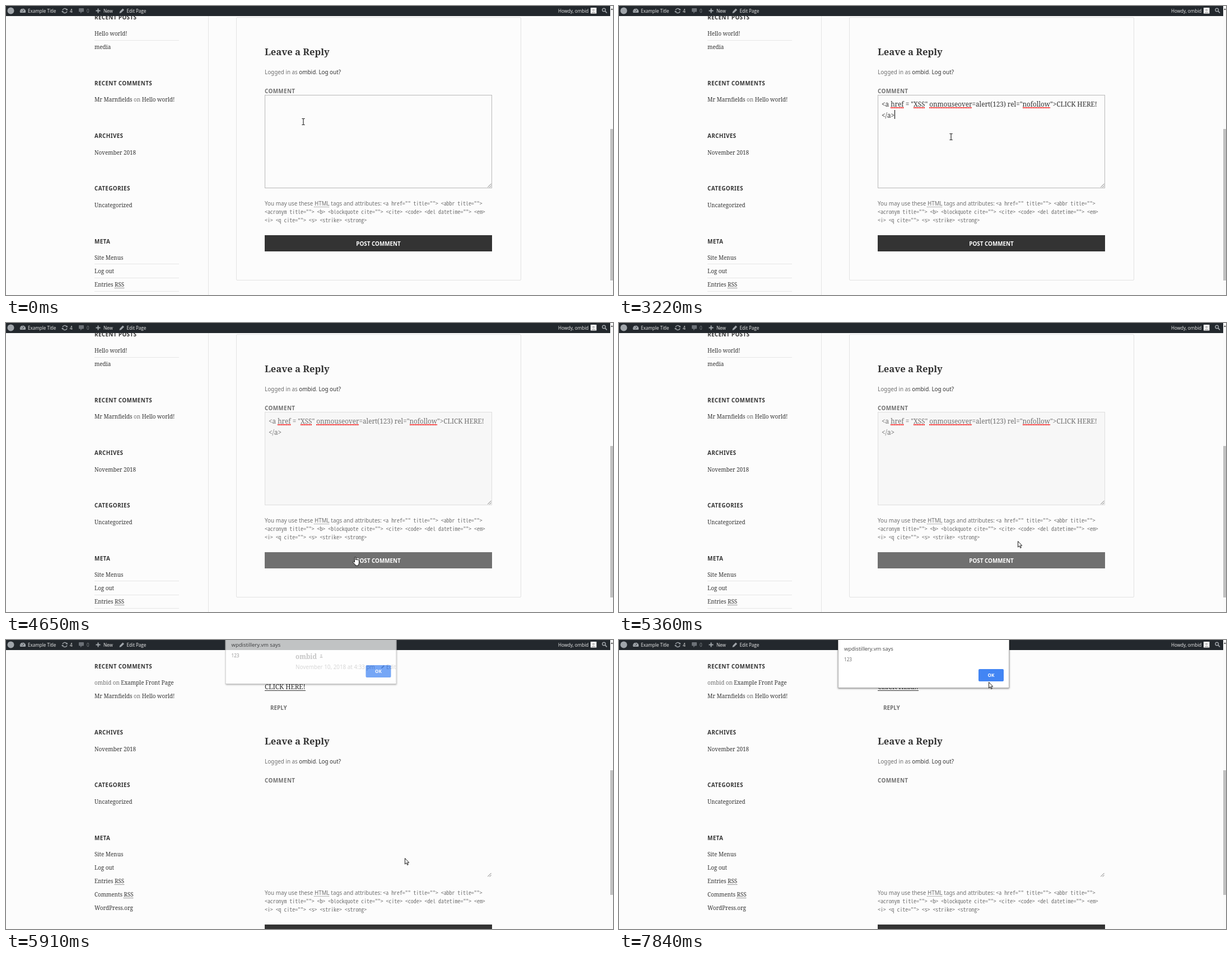
Recreate the animation shown at these times as an HTML page. Size 1084 by 517 pixels, loop 8 s.

```html
<!DOCTYPE html>
<html lang="en">
<head>
<meta charset="utf-8">
<title>Comment form</title>
<style>
html, body { margin: 0; width: 100%; height: 100%; overflow: hidden; background: #fcfcfc; }
#stage { position: relative; width: 1084px; height: 517px; overflow: hidden; background: #fcfcfc; color: #333; }
#stage div, svg { position: absolute; }
.t { white-space: pre; font: 9.85px/0 "Noto Sans", sans-serif; }
.serif { font-family: "Noto Serif", serif; }
.big { font-size: 11.7px; }
.head { font-size: 16.6px; font-weight: bold; }
.cap { font-weight: bold; letter-spacing: .04em; }
.bar { font: 8.1px/0 "Open Sans", sans-serif; color: #eee; }
.bold { font-weight: bold; }
.grey, i { color: #707070; font-style: normal; }
code { font: 9.85px/0 "Noto Sans Mono CJK JP", "Noto Sans Mono", monospace; }
u { text-decoration: underline dotted 1px; text-underline-offset: 2px; }
s { text-decoration: none; background: repeating-linear-gradient(90deg, #e33 0 2px, #f99 2px 3px) 0 100% / 100% 2px no-repeat; }
#area { box-sizing: border-box; left: 462px; top: 159px; width: 406px; height: 167px; border: 1px solid #b8b8b8; }
#area.off { background: #f7f7f7; border-color: #dedede; }
#post { left: 462px; top: 410px; width: 406px; height: 29px; background: #333; }
#caret { width: 1px; height: 16px; background: #000; }
#track { left: 1079px; top: 0; width: 5px; height: 517px; background: #fafafa; }
#thumb { left: 1079px; width: 5px; background: #c1c1c1; }
#top { left: 0; top: 0; width: 1079px; height: 18px; background: #23282d; }
#dialog { box-sizing: border-box; left: 391px; top: -10px; width: 306px; height: 96px; background: #fff; border: 1px solid #b4b4b4; box-shadow: 0 1px 3px #0007; }
#ok { left: 250px; top: 61px; width: 45px; height: 22px; border-radius: 2px; background: #4285f4; }
</style>
</head>
<body>
<div id="stage">
  <div id="before"></div>
  <div id="after"></div>
  <div id="form">
    <div id="area"></div>
    <div id="code"></div>
    <div id="caret"></div>
    <div id="post"></div>
    <svg width="8" height="8" style="left:860px;top:318px" stroke="#777"><path d="M0 6.5 6.5 0M3.5 6.5 6.5 3.5"/></svg>
  </div>
  <div id="track"></div>
  <div id="thumb"></div>
  <div id="top">
    <svg width="1084" height="18" fill="none" stroke="#a0a5aa" stroke-width="1.4">
      <circle cx="8.5" cy="8.5" r="6" fill="#a0a5aa" stroke="none"/>
      <path d="M25.3 12A5.2 5.2 0 1 1 34.7 12Z" fill="#a0a5aa" stroke="none"/>
      <path d="M29.5 10.5 32 6.5M26.5 9h1M29.5 5.2v1" stroke="#23282d" stroke-width="1"/>
      <path d="M101 7.5A4 4 0 0 1 108 6M109 9.5A4 4 0 0 1 102 11"/>
      <path d="M106.5 7.5h4L109 4.5ZM99 9h4l-2 3Z" fill="#a0a5aa" stroke="none"/>
      <path d="M131 4h7q1 0 1 1v4.5q0 1-1 1h-2.5l-2.5 3v-3h-2q-1 0-1-1v-4.5q0-1 1-1Z" fill="#6c7177" stroke="none"/>
      <path d="M160.5 8.5h8M164.5 4.5v8" stroke-width="2"/>
      <path d="M202.5 13 203.2 10 208.5 4.5 211 7 205.5 12.3Z" fill="#a0a5aa" stroke="none"/>
      <path d="M1044 3h10.5v10.5h-10.5Z" fill="#fff" stroke="none"/>
      <path d="M1045 13.5q0-3 4.2-3.3 4.2.3 4.2 3.3Z" fill="#c4c4c4" stroke="none"/>
      <circle cx="1049.2" cy="7.3" r="2.3" fill="#c4c4c4" stroke="none"/>
      <circle cx="1067.8" cy="7" r="2.8"/><path d="M1070 9.2 1073 12.5" stroke-width="1.8"/>
    </svg>
  </div>
  <svg width="4" height="4" style="left:1080px;top:4px"><path d="M0 3 2 0 4 3Z" fill="#555"/></svg>
  <div id="dialog"><div id="ok"></div></div>
  <svg id="cursor" width="20" height="24" style="left:0;top:0;overflow:visible" stroke="#000" stroke-linejoin="round">
    <path id="I" fill="none" d="M-2.5-5.5h2L0-5 .5-5.5h2M0-5V5M-2.5 5.5h2L0 5 .5 5.5h2"/>
    <path id="H" fill="#fff" stroke-width=".9" d="M-2.5 2V-6q0-1.3 1.1-1.3T-.3-6v4q0-1 1-1t1 1q0-.8 1-.8t1 1q0-.6.9-.6t.9 1V3q0 2-1.3 3.5V8h-5.3V6.5L-5 2.5q-.6-1.2.3-1.6t2.2 1.1Z"/>
    <path id="A" fill="#fff" stroke-width=".9" d="M.5.5V11L3 8.7 4.7 12.5 6.3 11.9 4.7 8.2H7.7Z"/>
  </svg>
</div>
<script>
const $ = id => document.getElementById(id);

// Text is placed by its left edge and the middle of its capitals.
function text(box, x, y, cls, html) {
  const el = document.createElement('div');
  el.className = 't ' + cls;
  el.style.cssText = `left:${x}px;top:${y}px`;
  el.innerHTML = html;
  $(box).append(el);
  return el;
}
function rect(box, x, y, w, h, style) {
  const el = document.createElement('div');
  el.style.cssText = `left:${x}px;top:${y}px;width:${w}px;height:${h}px;${style}`;
  $(box).append(el);
}
const title = (box, y, s) => text(box, 158, y, 'cap', s);
const item = (box, y, s) => text(box, 158, y, 'serif', s);

// Page before posting
rect('before', 361, 18, 1, 499, 'background:#e4e4e4');
rect('before', 411, 20, 507, 469, 'border:1px solid #e2e2e2;border-radius:2px');
for (const y of [61, 461, 486, 510]) rect('before', 158, y, 151, 1, 'background:#e6e6e6');
title('before', 20, 'RECENT POSTS');
item('before', 49, 'Hello world!');
item('before', 73, 'media');
title('before', 138, 'RECENT COMMENTS');
item('before', 167, 'Mr Marnfields <i>on</i> Hello world!');

// Page after posting
title('after', 47, 'RECENT COMMENTS');
item('after', 76, '<i>ombid on</i> Example Front Page');
item('after', 100, 'Mr Marnfields <i>on</i> Hello world!');
item('after', 455, 'Comments <u>RSS</u>');
item('after', 479, 'WordPress.org');
text('after', 517, 29, 'serif big bold', 'ombid');
text('after', 517, 48, 'grey', 'November 10, 2018 at 4:33 pm');
text('after', 679, 48, 'grey', 'Edit');
$('after').insertAdjacentHTML('beforeend',
  '<svg width="700" height="60" fill="#707070"><circle cx="563" cy="27" r="1.6"/><path d="M560.5 32q0-3 2.5-3t2.5 3ZM670 51l.5-2 4-4 1.5 1.5-4 4Z"/></svg>');
text('after', 462, 83, 'serif big', 'CLICK HERE!');
rect('after', 462, 90, 73, 1, 'background:#333');
text('after', 472, 121, 'bold grey', 'REPLY');

// Sidebar parts on both pages
for (const [box, dy] of [['before', 0], ['after', -67]]) {
  title(box, 232 + dy, 'ARCHIVES');
  item(box, 261.5 + dy, 'November 2018');
  title(box, 326 + dy, 'CATEGORIES');
  item(box, 356 + dy, 'Uncategorized');
  title(box, 421 + dy, 'META');
  item(box, 450 + dy, 'Site Menus');
  item(box, 474 + dy, 'Log out');
  item(box, 498 + dy, 'Entries <u>RSS</u>');
}

// Comment form
const code = s => `<code>${s.replace(/</g, '&lt;')}</code>`;
text('form', 462, 82, 'serif head', 'Leave a Reply');
text('form', 462, 118, '', '<i>Logged in as</i> ombid<i>.</i> Log out?');
text('form', 462, 152, 'cap grey', 'COMMENT');
text('form', 462, 353, 'grey', 'You may use these <u>HTML</u> tags and attributes: ' + code('<a href="" title=""> <abbr title="">'));
text('form', 462, 368, 'grey', code('<acronym title=""> <b> <blockquote cite=""> <cite> <code> <del datetime=""> <em>'));
text('form', 462, 383, 'grey', code('<i> <q cite=""> <s> <strike> <strong>'));
text('form', 665, 425, 'bold', 'POST COMMENT').style.cssText += 'color:#fff;transform:translateX(-50%)';
text('code', 469, 175, 'serif big',
  '&lt;a <s>href</s> = "<s>XSS</s>" <s>onmouseover</s>=alert(123) rel="<s>nofollow</s>"&gt;CLICK HERE!');
text('code', 469, 195, 'serif big', '&lt;/a&gt;');

// Top bar and dialog
for (const [x, s] of [[39, 'Example Title'], [114, '4'], [174, 'New'], [215.5, 'Edit Page'], [986, 'Howdy, ombid']])
  text('top', x, 8.5, 'bar', s);
text('top', 144, 8.5, 'bar', '0').style.color = '#8a8f94';
text('dialog', 10, 24.5, 'bar', 'wpdistillery.vm says').style.cssText += 'font-size:9.5px;color:#444';
text('dialog', 10, 44, 'bar', '123').style.color = '#666';
text('ok', 22.5, 11, 'bar bold', 'OK').style.cssText += 'color:#fff;transform:translateX(-50%)';

// Pointer: time, shape, x, y
const moves = [
  [0, 'I', 531, 207], [2250, 'I', 545, 211], [2370, 'I', 557, 214], [2520, 'I', 573, 222],
  [2640, 'I', 586, 228.5], [3070, '', 0, 0], [3220, 'I', 593, 234], [3340, 'I', 600, 270],
  [3460, 'I', 609, 312], [3580, 'I', 619, 350], [3730, 'I', 620, 384], [3860, 'H', 620, 424],
  [4000, 'H', 625, 426], [4920, 'H', 645, 419], [5050, 'A', 673, 401], [5200, 'A', 711, 390],
  [5360, 'A', 712, 390], [6470, 'A', 696, 370], [6620, 'A', 690, 363], [6780, 'A', 687, 352],
  [6930, 'A', 681, 266], [7080, 'A', 668, 158], [7200, 'A', 661, 136], [7600, 'A', 651, 114],
  [7720, 'A', 658, 95], [7840, 'A', 660, 75]
];
const blinks = [130, 560, 1120, 1670, 1820, 2370, 2910, 3460, 3860, 4400];

const show = (id, on) => $(id).style.display = on ? '' : 'none';

function draw(now) {
  const t = now % 8000;
  const typed = t >= 1820, sent = t >= 4650, loaded = t >= 5790;

  show('before', !loaded);
  show('after', loaded);
  $('form').style.top = loaded ? '99px' : 0;
  show('area', !loaded);
  $('area').className = sent ? 'off' : '';
  show('code', typed && !loaded);
  $('code').style.color = sent ? '#707070' : '#333';
  $('post').style.background = t >= 3860 && !loaded ? '#707070' : '#333';
  $('thumb').style.top = loaded ? '233px' : '220px';
  $('thumb').style.height = loaded ? '223px' : '271px';

  show('caret', blinks.filter(b => b <= t).length % 2);
  $('caret').style.left = typed ? '492px' : '469px';
  $('caret').style.top = typed ? '186px' : '168px';

  const opening = t < 6040;
  show('dialog', t >= 5910);
  $('dialog').style.opacity = opening ? .72 : 1;
  $('dialog').style.transform = opening ? 'translate(.5px,-7px)' : '';

  const [, shape, x, y] = moves.findLast(m => m[0] <= t);
  for (const s of 'IHA') show(s, s === shape);
  $('cursor').style.transform = `translate(${x}px,${y}px)`;
}

const start = performance.now();
(function loop() {
  draw(performance.now() - start);
  requestAnimationFrame(loop);
})();
</script>
</body>
</html>
```
